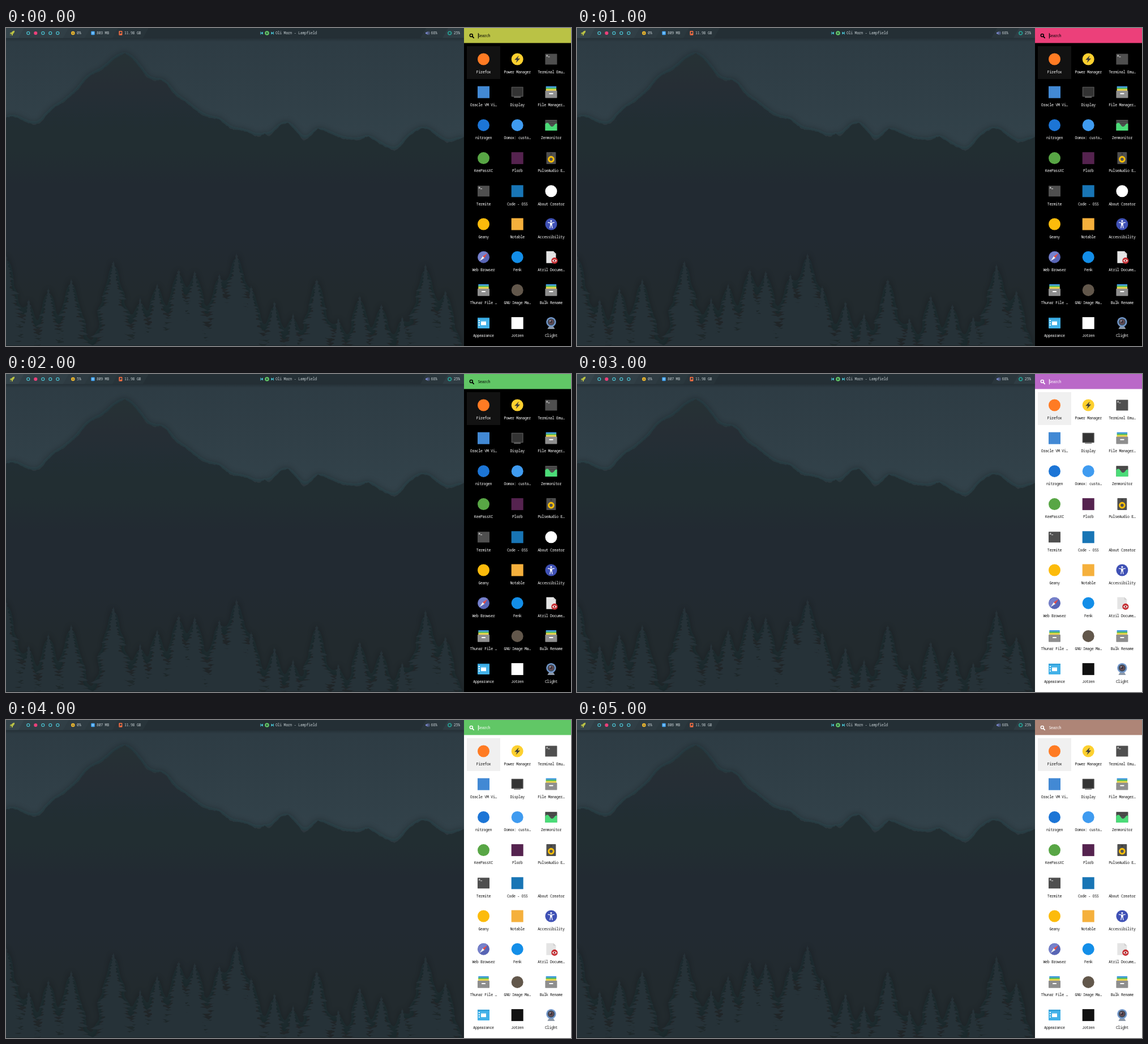
Write an HTML page that moves like this. It is 998 px wide and 561 px high and loops after 6000 ms.

```html
<!DOCTYPE html>
<html lang="en">
<head>
<meta charset="utf-8">
<title>Desktop launcher</title>
<style>
html, body { margin: 0; width: 100%; height: 100%; overflow: hidden; background: #212b30; }
svg { display: block; width: 100vw; height: 100vh; }
text { font: 500 6.6px "Noto Sans Mono", monospace; letter-spacing: -.31px; white-space: pre; }
.bar text { fill: #c3ccd0; font-weight: 400; }
.apps text { fill: var(--ink); text-anchor: middle; }
.head text { fill: var(--head); }
</style>
</head>
<body>
<svg id="stage" viewBox="0 0 998 561" preserveAspectRatio="none">
  <defs>
    <linearGradient id="sky" x2="0" y2="1">
      <stop stop-color="#2d3b43"/><stop offset="1" stop-color="#33434b"/>
    </linearGradient>
    <linearGradient id="hill" x2="0" y2="1">
      <stop stop-color="#263036"/><stop offset=".45" stop-color="#222c31"/><stop offset="1" stop-color="#20292e"/>
    </linearGradient>
    <linearGradient id="under" x2="0" y2="1">
      <stop stop-color="#1b2328" stop-opacity=".55"/><stop offset="1" stop-color="#1b2328" stop-opacity="0"/>
    </linearGradient>
    <filter id="shade" x="-5%" y="-10%" width="110%" height="120%">
      <feDropShadow dx="0" dy="0" stdDeviation="7" flood-color="#161d21" flood-opacity=".5"/>
    </filter>
  </defs>
  <rect width="809" height="220" fill="url(#sky)"/>
  <path id="ridge" fill="url(#hill)" filter="url(#shade)"/>
  <g id="trees" fill="#273238" filter="url(#shade)"></g>
  <rect y="560" width="809" height="1" fill="#1d262a"/>
  <rect y="17" width="809" height="7" fill="url(#under)"/>
  <g class="bar" id="bar"></g>
  <rect id="panel" x="809" width="189" height="561"/>
  <g class="head">
    <rect id="header" x="809" width="189" height="26.5"/>
    <g fill="none" stroke="var(--head)">
      <circle cx="821.8" cy="13" r="2.5" stroke-width="1.5"/>
      <path d="M823.7 14.9l2.4 2.4" stroke-width="1.9" stroke-linecap="round"/>
      <path id="caret" d="M834.3 9v9.5" stroke-width="1"/>
    </g>
    <text x="833.4" y="16.2">Search</text>
  </g>
  <rect id="pick" x="814" y="32" width="59" height="58"/>
  <g class="apps" id="apps"></g>
</svg>
<script>
const $ = id => document.getElementById(id);

let seed = 7;
const rand = () => (seed = (seed * 16807) % 2147483647) / 2147483647;

// Shape helpers return SVG markup.
const box = (x, y, w, h, fill, rx = 0) => `<rect x="${x}" y="${y}" width="${w}" height="${h}" rx="${rx}" fill="${fill}"/>`;
const disc = (x, y, r, fill) => `<circle cx="${x}" cy="${y}" r="${r}" fill="${fill}"/>`;
const ring = (x, y, r, color, w) => `<circle cx="${x}" cy="${y}" r="${r}" fill="none" stroke="${color}" stroke-width="${w}"/>`;
const path = (d, fill) => `<path d="${d}" fill="${fill}"/>`;
const line = (d, color, w) => `<path d="${d}" fill="none" stroke="${color}" stroke-width="${w}" stroke-linecap="round"/>`;
const label = (x, y, s, id = '') => `<text x="${x}" y="${y}"${id && ` id="${id}"`}>${s}</text>`;

function drawRidge() {
  const pts = [
    0,158, 10,156, 22,159, 35,166, 50,171, 60,168, 75,150, 88,138, 101,132, 115,120, 130,106,
    141,91, 152,82, 165,77, 180,66, 191,55, 200,50, 210,44, 221,52, 231,63, 241,76, 248,87,
    264,94, 272,91, 285,100, 294,114, 304,123, 316,129, 330,142, 345,153, 361,159, 376,161, 387,170,
    397,178, 426,183, 438,190, 447,192, 457,186, 465,191, 485,171, 498,167, 512,182, 526,199, 539,190,
    551,177, 579,189, 595,196, 622,198, 640,191, 660,205, 686,217, 697,209, 708,195, 722,183, 735,177,
    746,179, 765,194, 779,203, 795,198, 809,192
  ];
  let d = `M0 561V${pts[1]}`;
  for (let i = 2; i < pts.length; i += 2) {
    const [x0, y0, x1, y1] = pts.slice(i - 2, i + 2);
    const n = Math.max(2, Math.round((x1 - x0) / 2.5));
    for (let k = 1; k <= n; k++) {
      const wob = k < n ? (rand() - .5) * 1.8 : 0;
      d += `L${(x0 + (x1 - x0) * k / n).toFixed(1)} ${(y0 + (y1 - y0) * k / n + wob).toFixed(1)}`;
    }
  }
  $('ridge').setAttribute('d', d + 'V561Z');
}

function tree(x, top) {
  const sides = [-1, 1].map(dir => {
    const pts = [];
    let y = top + 4;
    while (y < 566) {
      const depth = y - top;
      const reach = Math.min(42, 1.5 + depth * .31) * (.6 + rand() * .55);
      const core = Math.min(30, depth * .1) + rand() * reach * .25;
      const drop = 2 + reach * .14;
      pts.push([x + dir * core, y], [x + dir * reach * .7, y + drop * .25],
        [x + dir * reach, y + drop], [x + dir * reach * .62, y + drop * 1.15]);
      y += 4 + rand() * 3.5;
    }
    return pts;
  });
  const all = [[x, top], ...sides[1], ...sides[0].reverse()];
  return `<path d="M${all.map(p => p.map(v => v.toFixed(1)).join(' ')).join('L')}Z"/>`;
}

function drawTrees() {
  const tips = [
    [0, 400], [40, 478], [75, 458], [115, 442], [190, 410], [237, 475], [267, 450], [305, 425], [333, 428],
    [377, 433], [407, 397], [433, 455], [474, 481], [507, 503], [549, 442], [587, 510], [625, 471],
    [663, 487], [700, 508], [741, 416], [776, 462]
  ];
  $('trees').innerHTML = tips.map(t => tree(...t)).join('');
}

function drawBar() {
  const slab = (x0, x1, fill) => path(`M${x0} 0H${x1 + 10}L${x1} 17.5H${x0 - (x0 ? 10 : 0)}Z`, fill);
  let s = box(0, 0, 809, 17.5, '#242f35');
  [[242, '#28343a'], [188, '#2b383e'], [139, '#2e3b42'], [101, '#313f46'], [22, '#36454c']]
    .forEach(([x, c]) => s += slab(0, x, c));
  s += path('M742 0H809V17.5H732Z', '#2a363c') + path('M781 0H809V17.5H771Z', '#303d44');

  // Launcher rocket
  s += path('M15.2 4.8C12.4 4.9 10.6 6.2 9.5 8L7.4 8.3 6.8 10.3 8.7 10.1 10.2 11.6 10 13.4 12 12.7 12.2 10.6C14 9.4 15.2 7.6 15.2 4.8ZM8 11.2L6.8 13.3 9 12.1Z', '#bac245');
  for (let i = 0; i < 5; i++) {
    const x = 39.3 + i * 13;
    s += i === 1 ? disc(x, 9, 3.1, '#ec407a') : ring(x, 9, 2.5, '#4dd0e1', 1.1);
  }
  s += ring(118.3, 9, 2.4, '#fbc02d', 1.7) + disc(118.3, 9, .9, '#fbc02d');
  s += box(150.3, 5.8, 6.4, 6.4, '#42a5f5', 1) + box(151.7, 7.2, 3.6, 3.2, '#7cc1f8');
  s += box(199.4, 5.3, 6, 7.4, '#ff7043', .8) + disc(202.6, 8.2, 1.7, '#303d44') + line('M201 11l1.4-1.5', '#303d44', .8);
  s += path('M453.8 6.6V11.4L450.4 9ZM449.4 6.6h1v4.8h-1Z', '#4dd0e1');
  s += disc(461, 9, 3.8, '#61c766') + path('M459.8 7L463 9 459.8 11Z', '#242f35');
  s += path('M468.5 6.6V11.4L471.9 9ZM471.9 6.6h1v4.8h-1Z', '#4dd0e1');
  s += path('M741 7.7h1.6L744.7 5.8V12.2L742.6 10.3H741Z', '#7986cb');
  s += line('M745.7 7.4q1.2 1.6 0 3.2M746.9 6.1q2.1 2.9 0 5.8', '#7986cb', .8);
  s += ring(783.7, 9, 2.7, '#26a69a', 1.3) + `<circle cx="783.7" cy="9" r="3.6" fill="none" stroke="#26a69a" stroke-dasharray="1.2 1.63"/>`;

  s += label(125, 11.3, '', 'cpu') + label(160, 11.3, '', 'mem') + label(209, 11.3, '11.98 GB');
  s += label(476, 11.3, 'Oli Marn - Lampfield') + label(750.5, 11.3, '68%') + label(790.8, 11.3, '25%');
  $('bar').innerHTML = s;
}

// Icons are drawn around their own centre.
const dot = c => disc(0, 0, 10.5, c);
const tile = c => box(-10.5, -10.5, 21, 21, c);
const terminal = box(-10.5, -9.5, 21, 19, '#4f4f4f', .6) +
  line('M-5.2-4.1h2.4', '#fff', .8) + line('M-6.4-6.9q-1.8-.7-1.8.3t1.7.9-1.7.7', '#fff', .7);
const drawer = box(-9.2, -10.5, 18.4, 4, '#3f9be0', .6) + box(-9.2, -7.8, 18.4, 3.5, '#63bf58') +
  box(-9.2, -5.3, 18.4, 4, '#f6d94b') + box(-10.5, -2.6, 21, 13, '#8e8e8e', .8) + box(-3.5, 1.6, 7, 1.9, '#fff', .4);
const icon = {
  power: dot('#fdd02f') + path('M2.6-6.5L-5 1.3H-.6L-2.6 6.5 5-1.3H.6Z', '#3d3d3d'),
  display: box(-10.5, -9.5, 21, 17.6, '#4f4f4f', .8) + box(-9, -8, 18, 14.6, '#333') + box(-6, 8.1, 12, 1.6, '#777'),
  monitor: box(-10.5, -9.5, 21, 19, '#4f4f4f', .6) + box(-10.5, -6.5, 21, .7, '#333') + box(-10.5, -3, 21, .7, '#333') +
    path('M-10.5-2C-7-6-4.5-4-2.5-.5S3 4 5.5.2 9-3 10.5-2.5V9.5H-10.5Z', '#4bdc78'),
  speaker: box(-8.4, -10.5, 16.8, 21, '#4f4f4f', .8) + disc(0, -7.4, 1.6, '#393939') + ring(0, 2, 4.3, '#ffc107', 3) + disc(0, 2, 2.2, '#555'),
  access: dot('#3f51b5') + disc(0, -5.5, 1.6, '#fff') + line('M-5.4-2.8L-1.2-2.2H1.2L5.4-2.8M-1.1-2V1.6L-2 6.5M1.1-2V1.6L2 6.5', '#fff', 1.3) + box(-1.4, -2.6, 2.8, 4.8, '#fff'),
  compass: dot('#5865b5') + path('M-7.4 7.4A10.5 10.5 0 0 1 7.4-7.4Z', '#7681cb') +
    path('M6.8-6.8L1.5 1.5-1.5-1.5Z', '#e84b44') + path('M-6.8 6.8L1.5 1.5-1.5-1.5Z', '#f0f0f0'),
  doc: path('M-8.5-10.5H4L8.5-6V10.5H-8.5Z', '#e4e4e4') + path('M4-10.5L8.5-6H4Z', '#cfcfcf') + disc(6, 6.2, 5.6, '#c62f34') +
    path('M2.1 6.2Q6 1.7 9.9 6.2 6 10.7 2.1 6.2Z', '#fff') + disc(6, 6.2, 1.5, '#8e1d22'),
  look: box(-10.5, -9.5, 21, 19, '#42b1e8', .8) + box(-10.5, -9.5, 21, 2, '#319fd6') +
    [-5.6, -1.6, 2.4].map(y => box(-8.7, y, 2, 2, '#fff')).join('') + box(-4.5, -3, 9, 6.6, '#fff') + box(-4.5, -3, 9, 1.3, '#c6e7f7'),
  webcam: path('M-6.5 10.5L-4 6H4L6.5 10.5Z', '#8d99a8') + disc(0, -2, 8.7, '#7197cb') + disc(0, -2, 6.2, '#434b57') +
    disc(0, -2, 3.8, '#6c4850') + disc(0, -2, 2, '#30333b') + disc(-1.7, -3.8, 1, '#c6d5e7')
};

const apps = [
  ['Firefox', dot('#ff7b23')], ['Power Manager', icon.power], ['Terminal Emu…', terminal],
  ['Oracle VM Vi…', tile('#4289d4')], ['Display', icon.display], ['File Manager…', drawer],
  ['nitrogen', dot('#1c75d6')], ['Oomox: custo…', dot('#3f9bf0')], ['Zenmonitor', icon.monitor],
  ['KeePassXC', dot('#58a645')], ['Plorb', tile('#55234f')], ['PulseAudio E…', icon.speaker],
  ['Termite', terminal], ['Code - OSS', tile('#1875b5')], ['About Creator', dot('#fff')],
  ['Geany', dot('#fcbb0b')], ['Notable', tile('#f5b03c')], ['Accessibility', icon.access],
  ['Web Browser', icon.compass], ['Fenk', dot('#138ee8')], ['Atril Docume…', icon.doc],
  ['Thunar File …', drawer], ['GNU Image Ma…', dot('#62574b')], ['Bulk Rename', drawer],
  ['Appearance', icon.look], ['Jotren', tile('var(--ink)')], ['Clight', icon.webcam]
];

function drawApps() {
  $('apps').innerHTML = apps.map(([name, art], i) => {
    const x = 843.5 + (i % 3) * 59.7, y = 55 + Math.floor(i / 3) * 58.2;
    return `<g transform="translate(${x} ${y.toFixed(1)})">${art}${label(0, 24.8, name)}</g>`;
  }).join('');
}

// One state per second: header colour, light theme, caret, CPU, memory
const states = [
  ['#bac245', 0, 1, 0, 803],
  ['#ec407a', 0, 1, 0, 809],
  ['#61c766', 0, 0, 5, 809],
  ['#ba68c8', 1, 1, 0, 807],
  ['#61c766', 1, 1, 0, 807],
  ['#ae8577', 1, 0, 0, 806]
];
let shown = -1;

function render(ms) {
  const i = Math.floor(ms / 1000) % states.length;
  if (i === shown) return;
  shown = i;
  const [color, light, caret, cpu, mem] = states[i];
  const style = $('stage').style;
  style.setProperty('--ink', light ? '#111' : '#fff');
  style.setProperty('--head', light ? '#fff' : '#000');
  $('header').setAttribute('fill', color);
  $('panel').setAttribute('fill', light ? '#fff' : '#000');
  $('pick').setAttribute('fill', light ? '#f0f0f0' : '#121212');
  $('caret').setAttribute('opacity', caret);
  $('cpu').textContent = cpu + '%';
  $('mem').textContent = mem + ' MB';
}

drawRidge();
drawTrees();
drawBar();
drawApps();
const start = performance.now();
const tick = () => {
  render(performance.now() - start);
  requestAnimationFrame(tick);
};
tick();
</script>
</body>
</html>
```
